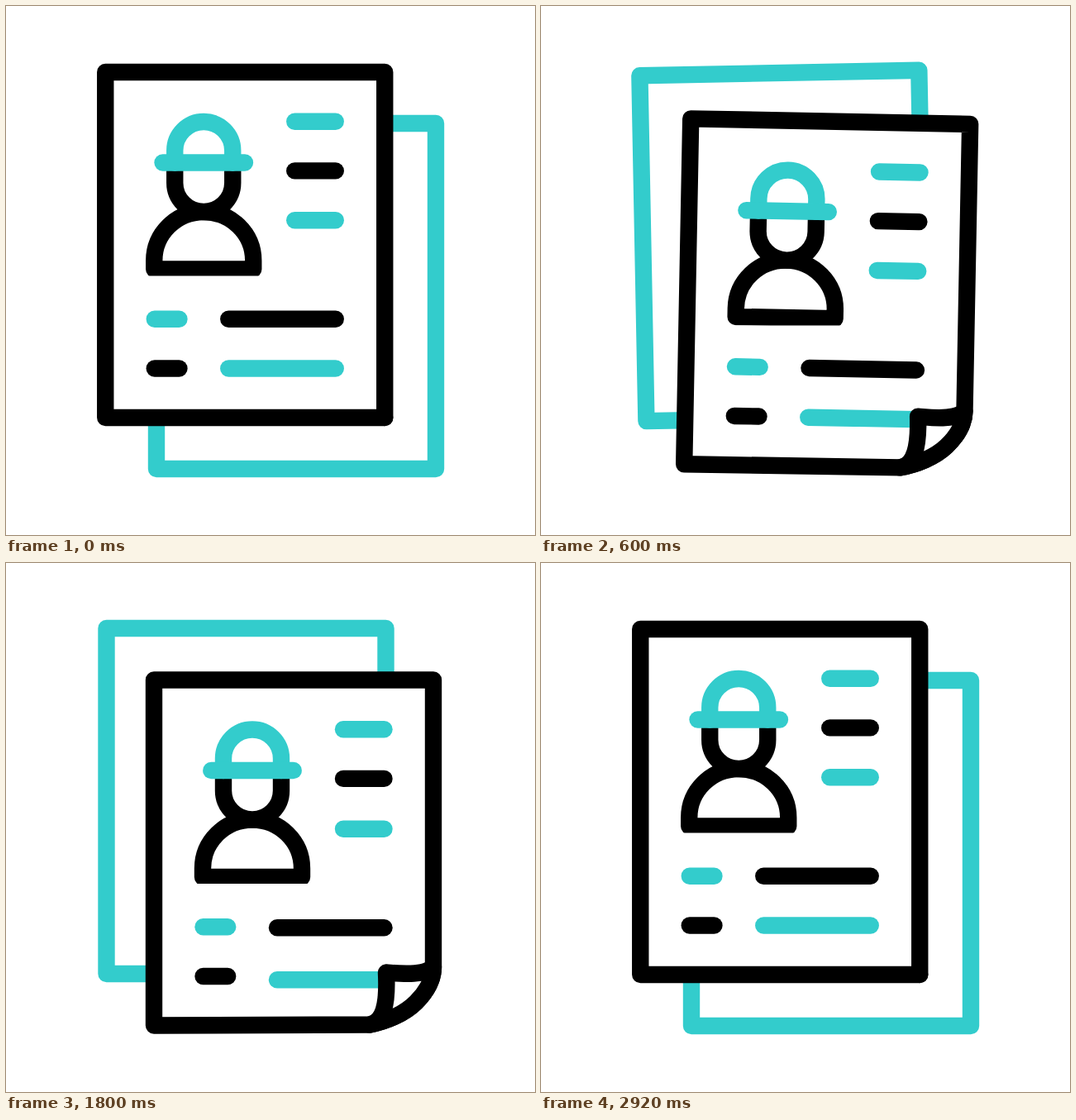
An HTML page without scripts for the animation above (3 s loop, 640x640 px).

```html
<!DOCTYPE html>
<html lang="en">
<head>
<meta charset="utf-8">
<title>Worker profile sheets</title>
<style>
html, body { margin: 0; width: 100%; height: 100%; overflow: hidden; background: #fff; }
svg { display: block; width: 100vw; height: 100vh; }

svg {
  --ink: #000;
  --teal: #33cccc;
  --ease: cubic-bezier(.333, 0, .667, 1);
  --ease-a: cubic-bezier(.333, 0, .667, .52);
  --ease-b: cubic-bezier(.333, .52, .667, 1);
  fill: none;
  stroke: var(--ink);
  stroke-width: 20.4;
  stroke-linecap: round;
  stroke-linejoin: round;
}
.teal { stroke: var(--teal); }
.solid { fill: #fff; }

.sheet { animation: move 3s var(--ease) infinite, turn 3s var(--ease) infinite; }
.front { --from: 289.25px 289px; --to: 348px 350.5px; --dir: 1; }
.back { --from: 351px 351px; --to: 290.5px 288px; --dir: -1; }
.level { --dir: -1; transform-origin: 19px 37.5px; animation: turn 3s var(--ease) infinite; }

/* page outline and folded corner: flat, half curled, curled */
.page {
  --flat: path("M-169 -209L169 -209L169 209C169 209 169 209 169 209C169 209 169 209 169 209L-169 209Z");
  --half: path("M-169 -209L169 -209L169 147C169 158 161 171 150 181C140 191 124 203 109 208L-169 209Z");
  --full: path("M-169 -209L169 -209L169 138C169 153 161 168 148 181C134 195 112 204 92 208L-169 209Z");
}
.flap {
  --flat: path("M169 209C169 209 169 209 169 209C169 209 169 209 169 209C169 209 169 209 169 209C169 209 169 209 169 209Z");
  --half: path("M109 208C123 207 133 184 138 175C148 170 168 163 169 147C169 158 161 171 150 181C140 191 124 203 109 208Z");
  --full: path("M92 208C108 205 114 185 112 145C127 146 157 150 169 138C169 153 161 168 148 181C134 195 112 204 92 208Z");
}
.page, .flap { animation: curl 3s linear infinite; }

.head { animation: nod 3s var(--ease) infinite; }
.row { animation: wave 3s var(--ease) infinite; }
.d1 { animation-delay: 40ms; }
.d2 { animation-delay: 80ms; }
.d3 { animation-delay: 120ms; }

@keyframes move {
  0%, 3.33%, 85%, 100% { translate: var(--from); }
  22%, 66% { translate: var(--to); }
}
@keyframes turn {
  0%, 3.33%, 22%, 66%, 85%, 100% { rotate: 0deg; }
  13%, 74.83% { rotate: calc(var(--dir) * 9deg); }
}
@keyframes curl {
  0%, 85%, 100% { d: var(--flat); }
  3.33% { d: var(--flat); animation-timing-function: var(--ease-a); }
  13% { d: var(--half); animation-timing-function: var(--ease-b); }
  22% { d: var(--full); }
  66% { d: var(--full); animation-timing-function: var(--ease-a); }
  74.83% { d: var(--half); animation-timing-function: var(--ease-b); }
}
@keyframes wave {
  0%, 22.67%, 58.5%, 100% { translate: 0 0; }
  30.17% { translate: 0 12.6px; }
  39.27% { translate: 0 -20px; }
  49.27% { translate: 0 24px; }
}
@keyframes nod {
  0%, 23%, 58.5%, 100% { translate: 0 0; }
  31.3% { translate: 0 15.5px; }
  40.93% { translate: 0 -22px; }
  47.5% { translate: 0 22px; }
}
</style>
</head>
<body>
<svg viewBox="0 0 640 640">
  <clipPath id="base"><rect class="level" x="-300" y="-300" width="600" height="337.5"/></clipPath>

  <g class="sheet back">
    <rect class="teal solid" x="-169" y="-209" width="338" height="418"/>
  </g>

  <g class="sheet front">
    <path class="page solid" d="M-169 -209H169V209H-169Z"/>

    <g clip-path="url(#base)">
      <path d="M-110 29.5V19a60 59 0 0 1 120 0V29.5Z"/>
    </g>
    <g class="head">
      <path class="solid" d="M-85 -96V-75a35 35 0 0 0 70 0V-96"/>
      <path class="teal solid" d="M-85 -99.5V-114a35 35 0 0 1 70 0V-99.5"/>
      <path class="teal" d="M-99.7 -99.5H-.3"/>
    </g>

    <path class="row teal" d="M60 -149.3H109.5"/>
    <path class="row d1" d="M60 -89.6H109.5"/>
    <path class="row d2 teal" d="M60 -29.8H109.5"/>
    <path class="row teal" d="M-109.5 89.8H-79.8"/>
    <path class="row d1" d="M-109.5 149.5H-79.8"/>
    <path class="row d2" d="M-20 89.8H109.5"/>
    <path class="row d3 teal" d="M-20 149.5H109.5"/>

    <path class="flap solid" d="M169 209Z"/>
  </g>
</svg>
</body>
</html>
```
